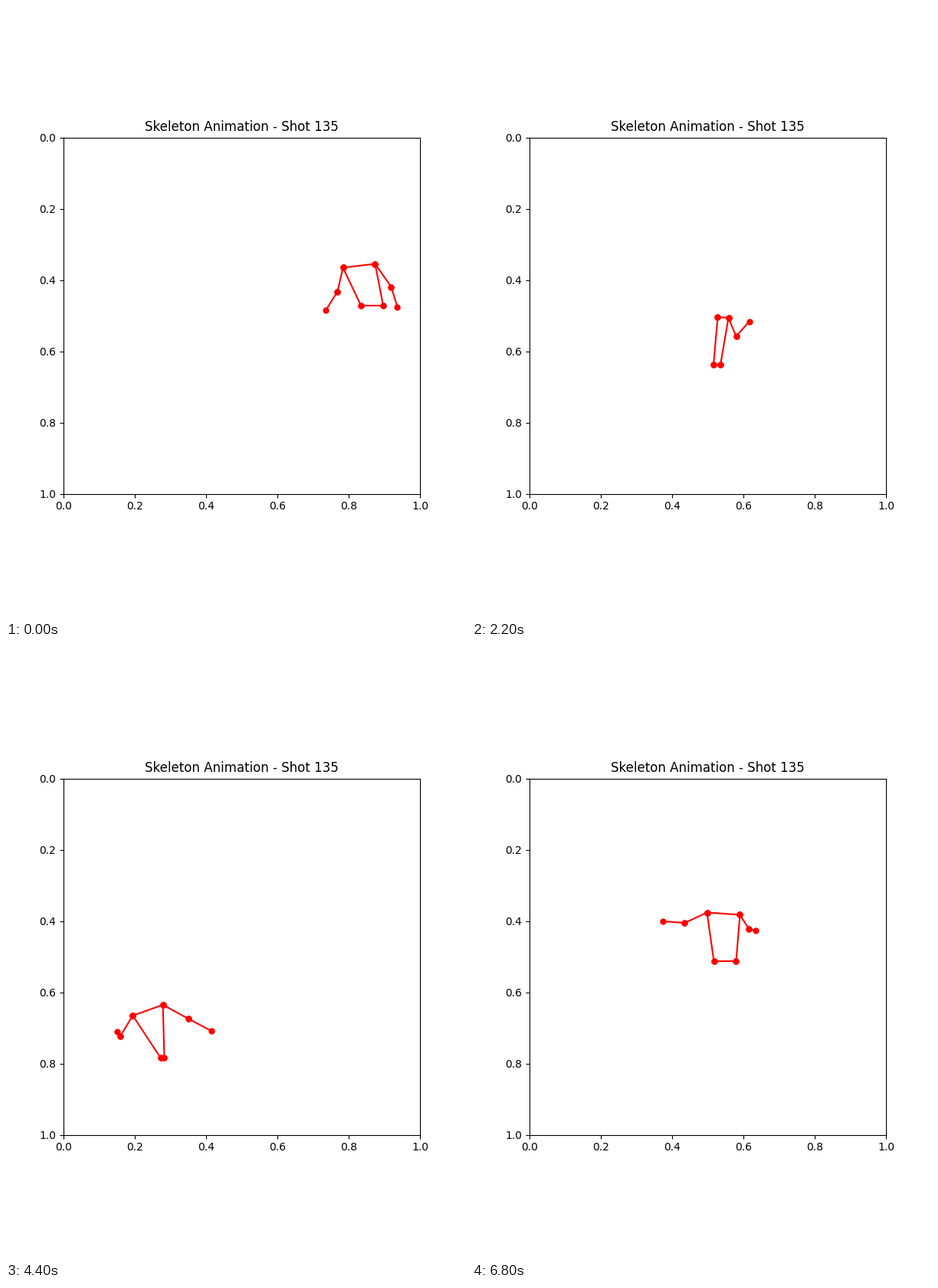
Animation, 600 px wide and 800 px high, one loop 6900 ms. Source, as a matplotlib script:

```python
import numpy as np
import matplotlib.pyplot as plt
from matplotlib.animation import FuncAnimation

FRAMES, STEP = 69, 100

BONES = [("l_sho", "r_sho"), ("l_sho", "l_elb"), ("l_elb", "l_wri"),
         ("r_sho", "r_elb"), ("r_elb", "r_wri"),
         ("l_sho", "l_hip"), ("r_sho", "r_hip"), ("l_hip", "r_hip")]
TURNED_AWAY = (0.5, 2.5)  # seconds in which the left arm is out of sight

# Middle of the shoulders on the stage: seconds, x, y
PATH = [(0, 460.5, 339), (1, 408, 363), (2.2, 327.5, 406.5), (3, 284.5, 355),
        (3.5, 250, 370), (4.4, 185, 474), (4.9, 218, 464), (5.4, 263, 435.5),
        (6.8, 328, 348)]

# Body lean and arm directions at the main poses
POSE_TIMES = [0, 1, 2.2, 3, 4.4, 5.4, 6.8]
LEAN = [17, 0, -8, 12, 19, -18, 2]
R_UPPER = [(21, 30), (12, 21), (10, 24), (4, 28), (33, 18), (20, 29), (12, 19)]
R_FORE = [(8, 26), (25, 1), (17, -19), (-20, 2), (30, 16), (16, 15), (9, 2)]
L_FORE = [(-15, 24), (-2, 24), (-14, -10), (-18, -21), (-4, -6), (-15, 14), (-28, -2)]


def bump(t, center, width):
    return np.exp(-((t - center) / width) ** 2)


def ease(t, start, end):
    u = np.clip((t - start) / (end - start), 0, 1)
    return u * u * (3 - 2 * u)


def glide(times, values, t):
    """Smooth curve through the given key values."""
    times, values = np.array(times, float), np.array(values, float)
    slopes = np.gradient(values, times, axis=0)
    i = min(np.searchsorted(times, t, side="right"), len(times) - 1) - 1
    span = times[i + 1] - times[i]
    u = (t - times[i]) / span
    s = u * u * (3 - 2 * u)
    pull = u * (1 - u) * ((1 - u) * slopes[i] - u * slopes[i + 1])
    return (1 - s) * values[i] + s * values[i + 1] + span * pull


def pose_at(t):
    path = np.array(PATH)
    chest = glide(path[:, 0], path[:, 1:], t)

    # Shoulders and hips narrow as the body turns
    width = 43 - 30 * bump(t, 2.45, 1.35)
    tilt = -5 + 6 * bump(t, 2.2, 0.5) - 9 * bump(t, 4.4, 0.6) + 8 * ease(t, 4.4, 5.4)
    shoulder = np.array([width, tilt]) / 2
    hip_width = 29 - 20 * bump(t, 2.2, 0.8) - 24 * bump(t, 4.4, 0.5)
    hip = np.array([hip_width / 2, 0])
    torso = np.array([glide(POSE_TIMES, LEAN, t), 62 - 10 * bump(t, 0, 0.5)])

    swing = np.radians(103 + 52 * ease(t, 3.6, 5.6))
    l_upper = 32 * np.array([np.cos(swing), np.sin(swing)])
    strike = bump(t, 2.87, 0.06) * np.array([0, -65])

    p = {"l_sho": chest - shoulder, "r_sho": chest + shoulder,
         "l_hip": chest + torso - hip, "r_hip": chest + torso + hip}
    p["l_elb"] = p["l_sho"] + l_upper
    p["l_wri"] = p["l_elb"] + glide(POSE_TIMES, L_FORE, t)
    p["r_elb"] = p["r_sho"] + glide(POSE_TIMES, R_UPPER, t) + strike
    p["r_wri"] = p["r_elb"] + glide(POSE_TIMES, R_FORE, t) + strike
    return p


def to_data(point):
    return (point - [75, 171.5]) / 465


fig, ax = plt.subplots(figsize=(6, 8), dpi=100)
ax.set(xlim=(0, 1), ylim=(1, 0), aspect="equal", title="Skeleton Animation - Shot 135")
lines = [ax.plot([], [], "ro-", markersize=5)[0] for _ in BONES]


def draw(frame):
    t = frame * STEP / 1000
    pose = pose_at(t)
    away = TURNED_AWAY[0] <= t < TURNED_AWAY[1]
    for line, (a, b) in zip(lines, BONES):
        line.set_data(*np.transpose([to_data(pose[a]), to_data(pose[b])]))
        line.set_visible(not (away and b in ("l_elb", "l_wri")))
    return lines


anim = FuncAnimation(fig, draw, frames=FRAMES, interval=STEP, repeat=True, repeat_delay=0)
plt.show()
```
